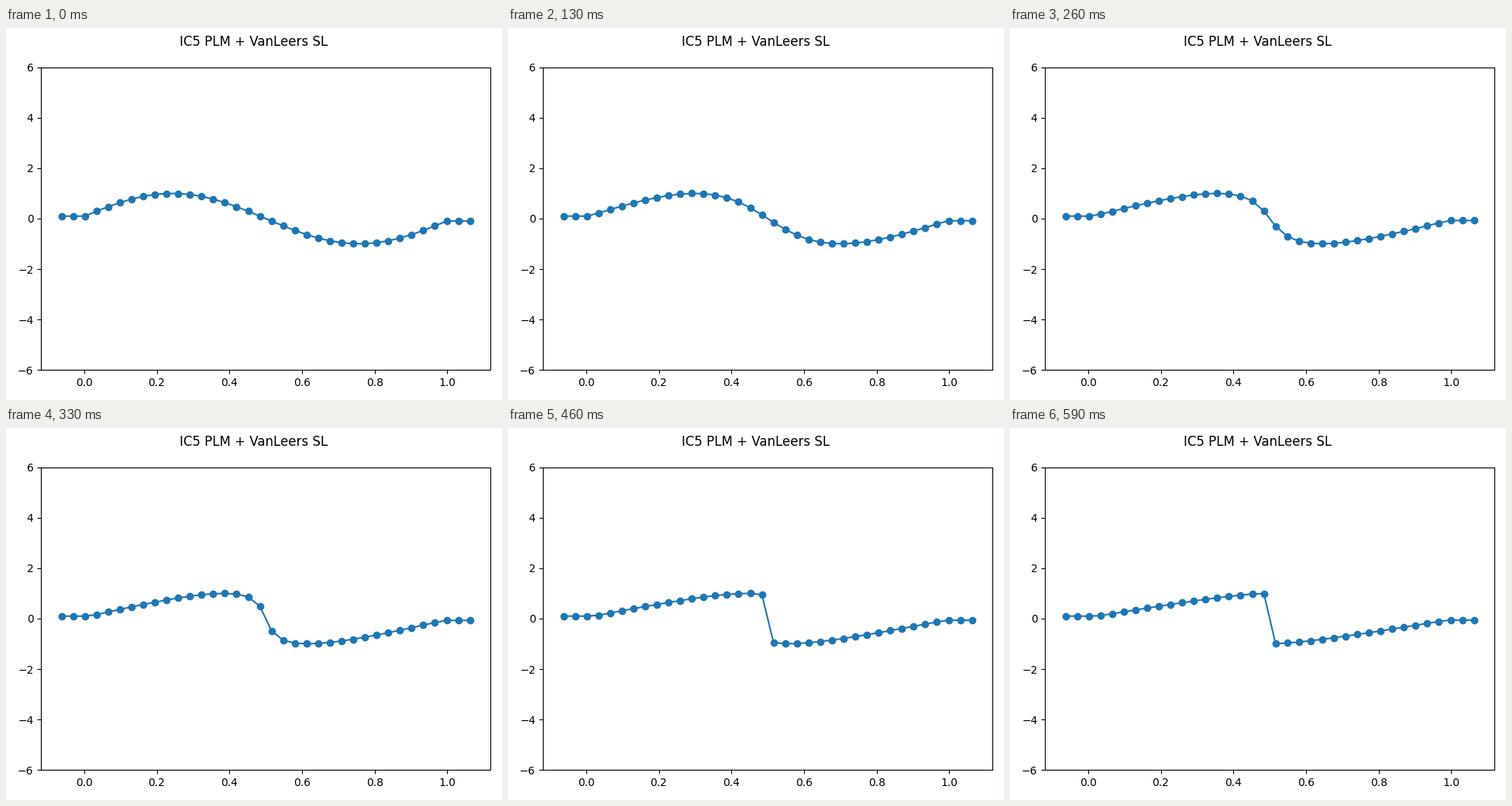
Animation of 640 by 480 pixels, one loop 0.66 s. Source, as a matplotlib script:

```python
import numpy as np
import matplotlib.pyplot as plt
from matplotlib.animation import FuncAnimation

CELLS = 32
GHOSTS = 2
STEPS = 10
DT = 1 / 36         # solver time per step
LOOP_MS = 660
TICK_MS = 10        # steps switch on a 10 ms clock
SAMPLES = 40        # points averaged in each cell

TICKS = LOOP_MS // TICK_MS
HEIGHT = 480

half = CELLS // 2
fine = (np.arange(half * SAMPLES) + 0.5) / (CELLS * SAMPLES)
feet = np.linspace(0, 0.5, 4001)
speed = np.sin(2 * np.pi * feet)
wall = np.sin(np.pi / CELLS)
edge = GHOSTS / CELLS
x = np.linspace(-edge, 1 + edge, CELLS + 2 * GHOSTS)


def burgers(step):
    """Cell averages of a sine wave steepening into a shock at x = 0.5."""
    reach = feet + step * DT * speed
    front = reach.argmax() + 1
    u = np.interp(fine, reach[:front], speed[:front])
    left = u.reshape(half, SAMPLES).mean(axis=1)
    u = np.concatenate([left, -left[::-1]])

    # Fixed inflow on the left, slow decay on the right
    u[0] = wall
    u[-1] = -wall / (1 + 0.07 * step)
    return np.pad(u, GHOSTS, mode="edge")


fig, ax = plt.subplots(figsize=(6.4, HEIGHT / 100), dpi=100)
fig.suptitle("IC5 PLM + VanLeers SL", y=0.98 + 1 / HEIGHT)
line, = ax.plot(x, burgers(0), "o-")
ax.set_xlim(ax.get_xlim())
ax.set_ylim(-6, 6)
fig.tight_layout()
fig.subplots_adjust(top=1 - 50.55 / HEIGHT)


def draw(tick):
    step = int((tick + 0.5) * STEPS / TICKS)
    line.set_ydata(burgers(step))
    return line,


anim = FuncAnimation(fig, draw, frames=TICKS, interval=TICK_MS, repeat=True)
plt.show()
```
